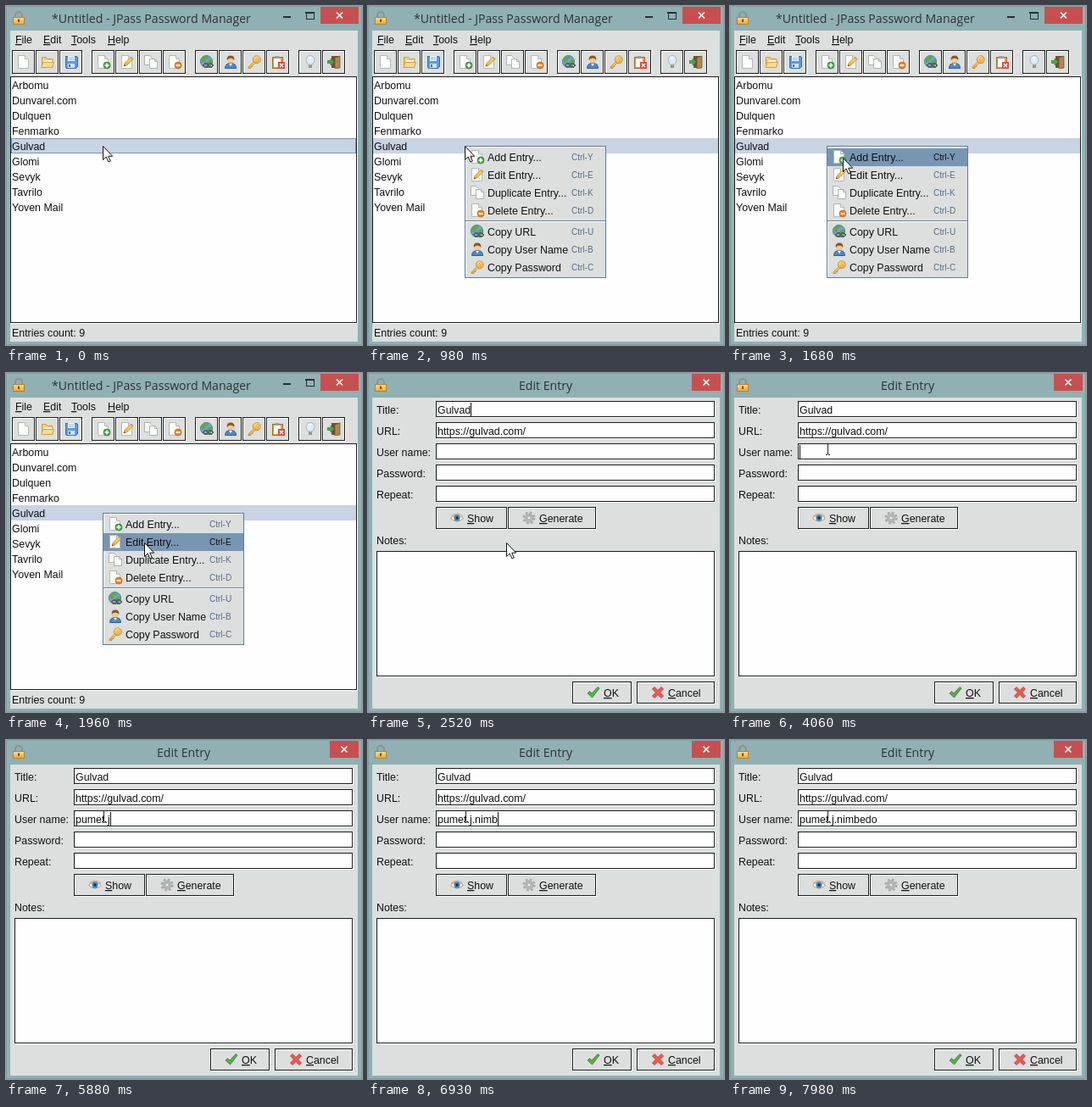
An HTML page for the animation above (8 s loop, 420 by 400 pixels).

```html
<!DOCTYPE html>
<html lang="en">
<head>
<meta charset="utf-8">
<title>Password manager</title>
<style>
  html, body { margin: 0; width: 100%; height: 100%; overflow: hidden; }
  svg { display: block; }
  text { font: 12.4px "Liberation Sans", Arial, sans-serif; fill: #111; white-space: pre; }
  .title { font: 14.1px "Open Sans", "Noto Sans", sans-serif; fill: #2b3334; }
  .accel { font-size: 10px; fill: #5c6b88; }
  .hot .accel { fill: #111; }
  .u { text-decoration: underline; }
  .crisp, rect { shape-rendering: crispEdges; }
</style>
</head>
<body>
<svg id="stage" width="420" height="400" viewBox="0 0 420 400">
  <defs>
    <linearGradient id="gold" x2="0" y2="1"><stop stop-color="#ffe28a"/><stop offset="1" stop-color="#eea72c"/></linearGradient>
    <symbol id="page" viewBox="0 0 16 16" overflow="visible">
      <path d="M1.5.5h8l4 4v11h-12z" fill="#fcfcfa" stroke="#b5b8b4"/>
      <path d="M9.5.5v4h4" fill="#e4e6e2" stroke="#b5b8b4"/>
    </symbol>
    <symbol id="folder" viewBox="0 0 16 16">
      <path d="M1.5 14V2.5h5l1.5 2h6V14z" fill="#f7cd76" stroke="#d99a35"/>
      <path d="M4 6h9v4H4z" fill="#fff"/>
      <path d="M.8 14.5 3 8.5h12.5l-2 6z" fill="#fbdc92" stroke="#dd9c38"/>
    </symbol>
    <symbol id="disk" viewBox="0 0 16 16">
      <rect x="1" y="1" width="14" height="14" rx="1" fill="#5d9bdc" stroke="#2f6fb5"/>
      <path d="M4 1h8v6H4z" fill="#eaf2fb"/><path d="M5 3h6M5 5h6" stroke="#9ab8d8"/>
      <path d="M4 10h8v5H4z" fill="#d5e3f1"/><path d="M5 11h2v3H5z" fill="#3970ac"/>
    </symbol>
    <symbol id="add" viewBox="0 0 16 16" overflow="visible">
      <use href="#page"/><circle cx="12" cy="12" r="4" fill="#4ba547" stroke="#2d7a2d" stroke-width=".7"/>
      <path d="M12 9.5v5M9.5 12h5" stroke="#fff" stroke-width="1.6"/>
    </symbol>
    <symbol id="edit" viewBox="0 0 16 16" overflow="visible">
      <use href="#page"/>
      <path d="m4 13 1-3.5L12.5 2 15 4.500 7.5 12z" fill="url(#gold)" stroke="#c78322" stroke-width=".8"/>
      <path d="m4 13 .6-2L6 12.4z" fill="#444"/><path d="M11.5 3 14 5.5l1-1L12.5 2z" fill="#e58a72"/>
    </symbol>
    <symbol id="copy" viewBox="0 0 16 16" overflow="visible">
      <path d="M.5.5h6l3 3v8h-9z" fill="#fbfbf9" stroke="#aeb2af"/>
      <path d="M6.5 4.5h6l3 3v8h-9z" fill="#fdfdfb" stroke="#aeb2af"/>
      <path d="M12.5 4.5v3h3" fill="none" stroke="#aeb2af"/>
    </symbol>
    <symbol id="del" viewBox="0 0 16 16" overflow="visible">
      <use href="#page"/><circle cx="12" cy="12" r="4" fill="#e98625" stroke="#b85d0e" stroke-width=".7"/>
      <path d="M9.5 12h5" stroke="#fff" stroke-width="1.8"/>
    </symbol>
    <symbol id="globe" viewBox="0 0 16 16">
      <circle cx="7.5" cy="7.5" r="7" fill="#6fa9cf" stroke="#43798f"/>
      <path d="M2 4q3-4 7-3l1 3-3 1-1 3-4 1zM9 6l5-1v5l-4 4-2-4z" fill="#62a553"/>
      <g fill="none" stroke="#59625f" stroke-width="1.5"><rect x="4" y="10" width="6" height="4" rx="2"/><rect x="9" y="10" width="6" height="4" rx="2"/></g>
    </symbol>
    <symbol id="user" viewBox="0 0 16 16">
      <path d="M1.5 15.5q0-6 6.5-6t6.5 6z" fill="#4f88c9" stroke="#2c5f9d"/>
      <path d="m6 10 2 3 2-3z" fill="#fff"/><circle cx="8" cy="5.5" r="4" fill="#f4c795"/>
      <path d="M3.700 6Q3 .5 8 .5T12.300 6Q11 3.500 8 3.500T3.700 6z" fill="#8a5425"/>
    </symbol>
    <symbol id="key" viewBox="0 0 16 16">
      <path d="m8 7-7 7v1.5h3v-2h2v-2l4-3z" fill="url(#gold)" stroke="#cb8628" stroke-width=".8"/>
      <circle cx="10.800" cy="5.2" r="4.500" fill="url(#gold)" stroke="#cb8628" stroke-width=".8"/>
      <circle cx="12" cy="4" r="1.3" fill="#fff" stroke="#b8792a" stroke-width=".6"/>
    </symbol>
    <symbol id="clip" viewBox="0 0 16 16">
      <rect x="1" y="2" width="12" height="13" fill="#d8a04e" stroke="#a46f26"/>
      <path d="M3 4h8v10H3z" fill="#fafaf7"/><path d="M4.5 1h5v3h-5z" fill="#9aa0a3"/>
      <rect x="8" y="8" width="8" height="8" fill="#d9483b"/><path d="m10 10 4 4m0-4-4 4" stroke="#fff" stroke-width="1.5"/>
    </symbol>
    <symbol id="bulb" viewBox="0 0 16 16">
      <path d="M5.5 11Q3 8 3 5.5a5 5 0 0 1 10 0Q13 8 10.5 11z" fill="#dfeaf5" stroke="#9fb6cb"/>
      <path d="M6 4q2-2 3 0" fill="none" stroke="#fff" stroke-width="1.5"/><path d="M6 11.5h4V15H6z" fill="#8d9699"/>
    </symbol>
    <symbol id="exit" viewBox="0 0 16 16">
      <path d="M5 1h10v14H5z" fill="#6d5138"/><path d="m9 3 6-2v14l-6 1z" fill="#b1884f" stroke="#705028" stroke-width=".7"/>
      <path d="M0 6.5h4V4l4.5 4L4 12V9.5H0z" fill="#4fa348" stroke="#2f7730" stroke-width=".6"/>
    </symbol>
    <symbol id="eye" viewBox="0 0 16 16">
      <path d="M.5 8.5q7-8 15 0-7.5 7-15 0z" fill="#fff" stroke="#c08b66"/>
      <circle cx="8" cy="8" r="3.7" fill="#3f8cc8"/><circle cx="8" cy="8" r="1.7" fill="#173048"/>
      <path d="M1 6q7-6 14 0" fill="none" stroke="#d6a17a"/>
    </symbol>
    <symbol id="gear" viewBox="0 0 16 16">
      <circle cx="8" cy="8" r="6.3" fill="none" stroke="#a4a8a8" stroke-width="2.5" stroke-dasharray="2.6 2.348"/>
      <circle cx="8" cy="8" r="4" fill="#e2e4e4" stroke="#b0b4b4" stroke-width="3"/><circle cx="8" cy="8" r="2" fill="#f2f3f3" stroke="#8f9494" stroke-width=".8"/>
    </symbol>
    <symbol id="ok" viewBox="0 0 16 16"><path d="m1 9 2.5-2.5L6 9l7-7.5L15 3 6.5 14z" fill="#5bae4b" stroke="#347d31" stroke-width=".8"/></symbol>
    <symbol id="no" viewBox="0 0 16 16"><path d="m4 1.5 4 4 4-4L14.5 4l-4 4 4 4-2.5 2.5-4-4-4 4L1.5 12l4-4-4-4z" fill="#ea5a50" stroke="#b9302c" stroke-width=".8"/></symbol>
    <symbol id="lock" viewBox="0 0 16 16">
      <path d="M4 8V5a4 4 0 0 1 8 0v3" fill="none" stroke="#8c9292" stroke-width="2"/>
      <rect x="1.5" y="7" width="13" height="8.5" rx="1" fill="url(#gold)" stroke="#ba8128"/>
      <path d="M8 9.5V13" stroke="#775116" stroke-width="2"/>
    </symbol>
  </defs>
</svg>
<script>
const FACE = '#dcdfdd', FRAME = '#90b0b3', LOOP = 8000, TICK = 70;
const svg = document.getElementById('stage');

const rect = (x, y, w, h, fill, extra = '') =>
  `<rect x="${x}" y="${y}" width="${w}" height="${h}" fill="${fill}" ${extra}/>`;
const line = (d, color) => `<path class="crisp" d="${d}" fill="none" stroke="${color}"/>`;
const text = (x, y, s, attrs = '') =>
  `<text x="${x}" y="${y}" ${attrs}>${s.replace(/_(.)/, '<tspan class="u">$1</tspan>')}</text>`;
const icon = (id, x, y, size = 16) => `<use href="#${id}" x="${x}" y="${y}" width="${size}" height="${size}"/>`;

// Bordered box with a light edge below and to the right
const box = (x, y, w, h, fill) =>
  rect(x, y, w, h, '#1c1c1c') + rect(x + 1, y + 1, w - 2, h - 2, fill) +
  line(`M${x + 1} ${y + h + .5}H${x + w + .5}V${y + 1}`, '#fff');
const button = (x, y, w, h) =>
  box(x, y, w, h, FACE) + line(`M${x + 1.5} ${y + h - 2}V${y + 1.5}H${x + w - 2}`, '#fff');
const field = (x, y, w, h) => box(x, y, w, h, '#fefefe');
const labelled = (x, y, w, id, ix, tx, s) =>
  button(x, y, w, 26) + icon(id, ix, y + 5) + text(tx, y + 18, s);

const closeBox = (x, w) => rect(x, 1, w, 20, '#c84f4f') +
  `<path d="m${x + w / 2 - 3.5} 7.5 7 7m0-7-7 7" stroke="#fff" stroke-width="1.7"/>`;

const tools = [
  [7, 'page folder disk'], [101, 'add edit copy del'],
  [223, 'globe user key clip'], [345, 'bulb exit']
];
const entries = ['Arbomu', 'Dunvarel.com', 'Dulquen', 'Fenmarko', 'Gulvad', 'Glomi', 'Sevyk', 'Tavrilo', 'Yoven Mail'];
const menu = [
  ['add', 'Add Entry...', 'Y'], ['edit', 'Edit Entry...', 'E'],
  ['copy', 'Duplicate Entry...', 'K'], ['del', 'Delete Entry...', 'D'],
  ['globe', 'Copy URL', 'U'], ['user', 'Copy User Name', 'B'], ['key', 'Copy Password', 'C']
];
const itemY = i => 168 + i * 21 + (i > 3 ? 4 : 0);

const mainWindow = () =>
  text(54, 20, '*Untitled - JPass Password Manager', 'class="title"') +
  rect(327, 12, 9, 2, '#263032') +
  rect(354, 8, 9, 7, 'none', 'stroke="#263032"') + rect(353, 7, 11, 2, '#263032') +
  closeBox(371, 45) +
  [[11, '_File'], [44, '_Edit'], [77, '_Tools'], [120, '_Help']].map(([x, s]) => text(x, 44, s)).join('') +
  tools.map(([x, ids]) => ids.split(' ').map((id, i) =>
    button(x + i * 28, 52, 27, 28) + icon(id, x + i * 28 + 6, 58)).join('')).join('') +
  field(5, 83, 409, 291) +
  rect(6, 156, 407, 18, '#c8d3e3') +
  '<g id="focus">' + line('M6.5 156.5H412.5V173.5H6.5z', '#7c98b0') + '</g>' +
  entries.map((s, i) => text(7, 98 + i * 18, s)).join('') +
  text(7, 390, 'Entries count: 9');

const popup = () => '<g id="popup">' +
  rect(114, 165, 167, 156, '#617a93') + rect(115, 166, 165, 154, FACE) +
  line('M115.5 319V166.5H279', '#f6f8f7') +
  line('M115 253.5H280', '#6f8499') + line('M115 254.5H280', '#fff') +
  menu.map(([id, s, k], i) => `<g class="item">` +
    rect(115, itemY(i), 165, 21, '#7896b2', 'class="bar"') + icon(id, 121, itemY(i) + 2) +
    text(141, itemY(i) + 15, s) + text(240, itemY(i) + 14, 'Ctrl-' + k, 'class="accel"') + '</g>').join('') + '</g>';

const labels = ['Title:', 'URL:', 'User name:', 'Password:', 'Repeat:'];
const editDialog = () =>
  text(178, 20, 'Edit Entry', 'class="title"') + closeBox(382, 34) +
  labels.map((s, i) => text(10, 48 + i * 25, s) + field(80, 33 + i * 25, 329, 19)).join('') +
  text(82, 48, entries[4], 'id="name"') + text(82, 73, 'https://gulvad.com/') + text(82, 98, '', 'id="typed"') +
  labelled(80, 158, 84, 'eye', 97, 117, '_Show') +
  labelled(165, 158, 104, 'gear', 182, 202, '_Generate') +
  text(10, 202, 'Notes:') + field(10, 210, 399, 148) +
  labelled(241, 364, 70, 'ok', 258, 278, '_OK') +
  labelled(317, 364, 92, 'no', 334, 354, '_Cancel') +
  rect(82, 35, 1, 16, '#111', 'id="caret"');

svg.insertAdjacentHTML('beforeend',
  rect(0, 0, 420, 400, FRAME) + rect(.5, .5, 419, 399, 'none', 'stroke="#7f9fa2"') +
  rect(5, 29, 410, 367, FACE) + icon('lock', 7, 6) +
  `<g id="main">${mainWindow()}${popup()}</g><g id="dialog">${editDialog()}</g>
  <path id="arrow" d="M.5.5v16l3.7-3.5 2.7 6 2.4-1.1L6.700 12.200h5z" fill="#fff" stroke="#111"/>
  <path id="beam" class="crisp" d="M-2-6.5h2m1 0h2M.5-6V6M-2 6.5h2m1 0h2" fill="none" stroke="#222"/>`);

const $ = id => document.getElementById(id);
const show = (el, on) => { el.style.display = on ? '' : 'none'; };
const items = [...svg.querySelectorAll('.item')];
const typedText = 'pumet.j.nimbedo';
const keyTimes = [4620, 4830, 5110, 5250, 5460, 5600, 5880, 6160, 6370, 6580, 6720, 6930, 7070, 7210, 7490];
const BLINK = 490;

// Pointer travel advances once per tick
const moves = [
  { start: 1470, steps: 7, from: [114, 165], to: [163, 200] },
  { start: 2870, steps: 11, from: [163, 200], to: [115, 90] }
];
function pointer(t) {
  const m = moves[t < 2870 ? 0 : 1];
  const p = Math.max(0, Math.min(1, Math.floor((t - m.start) / TICK) / m.steps));
  const e = p * p * (3 - 2 * p);
  return m.from.map((a, i) => Math.round(a + (m.to[i] - a) * e));
}

function draw(t) {
  const editing = t >= 2520, open = t >= 980;
  const [x, y] = pointer(t);
  show($('main'), !editing);
  show($('dialog'), editing);
  show($('popup'), open);
  show($('focus'), !open);
  items.forEach((el, i) => {
    const hot = y > itemY(i) && y < itemY(i) + 21 && t >= 1540;
    el.classList.toggle('hot', hot);
    show(el.querySelector('.bar'), hot);
  });

  const overField = editing && y >= 33 && y < 152 && (y - 33) % 25 < 19;
  show($('arrow'), !overField);
  show($('beam'), overField);
  for (const id of ['arrow', 'beam']) $(id).setAttribute('transform', `translate(${x} ${y})`);

  if (!editing) return;
  const count = keyTimes.filter(k => k <= t).length;
  const typed = $('typed'), caret = $('caret'), inUser = t >= 4060;
  typed.textContent = typedText.slice(0, count);
  const since = inUser ? (count ? keyTimes[count - 1] : 4060) : 2450;
  const width = inUser ? (count ? typed.getComputedTextLength() : 0) : $('name').getComputedTextLength();
  caret.setAttribute('x', Math.round(82 + width));
  caret.setAttribute('y', inUser ? 85 : 35);
  show(caret, Math.floor((t - since) / BLINK) % 2 === 0 && !(t >= 3920 && t < 4060));
}

const begin = performance.now();
function tick() {
  draw((performance.now() - begin) % LOOP);
  requestAnimationFrame(tick);
}
tick();
</script>
</body>
</html>
```
